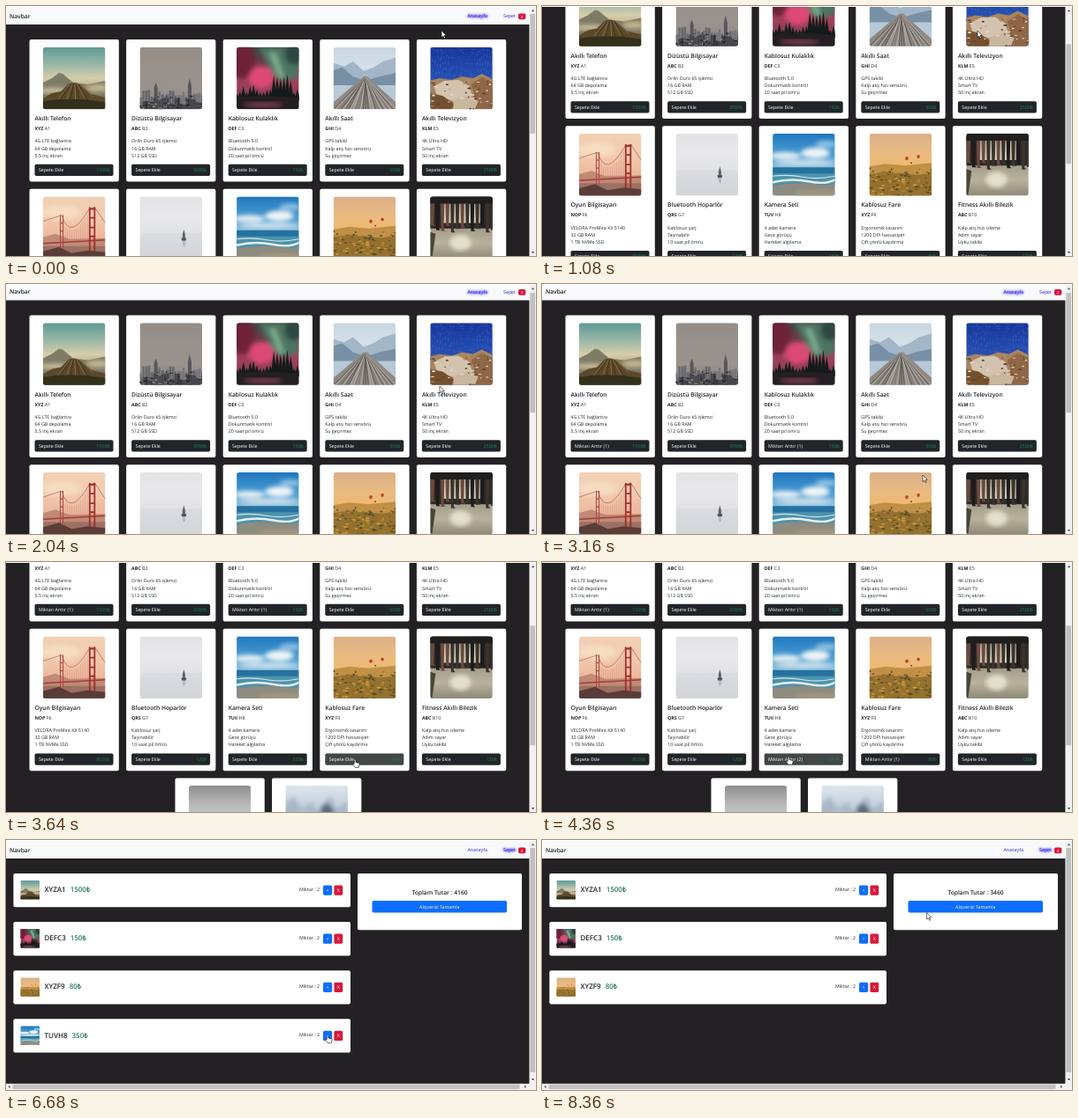
Recreate the animation shown at these times as an HTML page. Size 600 by 284 pixels, loop 8400 ms.

```html
<!DOCTYPE html>
<html lang="tr">
<head>
<meta charset="utf-8">
<title>Navbar</title>
<style>
html, body { margin: 0; width: 100%; height: 100%; overflow: hidden; background: #232123; }
svg { display: block; width: 100vw; height: 100vh; }
text { font: 5.3px "Open Sans", "Noto Sans", sans-serif; fill: #212529; text-rendering: geometricPrecision; white-space: pre; }
.title { font-size: 6.7px; font-weight: 600; }
.bold { font-weight: 700; }
.big { font-size: 8px; font-weight: 600; }
.white { fill: #fff; font-weight: 500; }
.green { fill: #198754; }
.big .green { fill: #2f7d62; }
.link { fill: #2a22e0; }
.active { filter: drop-shadow(0 0 1px #4a40ff) drop-shadow(0 0 1.5px #6a60ff); }
.mid { text-anchor: middle; }
.end { text-anchor: end; }
</style>
</head>
<body>
<svg id="stage" viewBox="0 0 600 284" xmlns="http://www.w3.org/2000/svg"></svg>
<script>
const LOOP = 8400, STEP = 40;
const CARD_Y = 38, ROW = 169.7, COL = 109.6;

// name, code, model, three features, price
const products = [
  ["Akıllı Telefon", "XYZ", "A1", "4G LTE bağlantısı", "64 GB depolama", "5.5 inç ekran", 1500],
  ["Dizüstü Bilgisayar", "ABC", "B2", "Orlin Duro k5 işlemci", "16 GB RAM", "512 GB SSD", 3000],
  ["Kablosuz Kulaklık", "DEF", "C3", "Bluetooth 5.0", "Dokunmatik kontrol", "20 saat pil ömrü", 150],
  ["Akıllı Saat", "GHI", "D4", "GPS takibi", "Kalp atış hızı sensörü", "Su geçirmez", 500],
  ["Akıllı Televizyon", "KLM", "E5", "4K Ultra HD", "Smart TV", "50 inç ekran", 2500],
  ["Oyun Bilgisayarı", "NOP", "F6", "VELDRA ProMira KX 5140", "32 GB RAM", "1 TB NVMe SSD", 8000],
  ["Bluetooth Hoparlör", "QRS", "G7", "Kablosuz şarj", "Taşınabilir", "10 saat pil ömrü", 120],
  ["Kamera Seti", "TUV", "H8", "4 adet kamera", "Gece görüşü", "Hareket algılama", 350],
  ["Kablosuz Fare", "XYZ", "F9", "Ergonomik tasarım", "1200 DPI hassasiyet", "Çift yönlü kaydırma", 80],
  ["Fitness Akıllı Bilezik", "ABC", "B10", "Kalp atış hızı izleme", "Adım sayar", "Uyku takibi", 120],
  ["Akıllı Lamba", "DEF", "C11", "LED aydınlatma", "Uzaktan kontrol", "Ayarlanabilir renk", 200],
  ["Tablet Standı", "GHI", "D12", "Alüminyum gövde", "Katlanabilir", "Kaymaz taban", 90]
];
const cartOrder = [0, 2, 8, 7];
// time, product, change of amount
const clicks = [
  [2440, 0, 1], [2880, 2, 1], [3680, 8, 1], [4040, 7, 1], [4280, 7, 1],
  [5800, 0, 1], [6040, 2, 1], [6360, 8, 1], [7280, 7, 1], [8000, 7, -3]
];
const CART_AT = 5280;
const scrollKeys = [[900, 0], [1080, 71.5], [1440, 276], [1580, 276], [1940, 2.5],
  [3240, 2.5], [3500, 132], [4780, 132], [5080, 0]];
const cursorKeys = [[1700, 493, 28], [2040, 491, 116], [2360, 75, 185], [2480, 75, 185],
  [2800, 290, 185], [2960, 290, 185], [3160, 431, 217], [3240, 431, 217], [3540, 395, 224],
  [3720, 395, 224], [3960, 279, 221], [4440, 279, 221], [4760, 596, 110], [5080, 596, 35],
  [5200, 590, 11], [5300, 588, 11], [5680, 364, 57], [5840, 364, 57], [5960, 364, 112],
  [6080, 364, 112], [6280, 364, 167], [6400, 364, 167], [6700, 364, 222], [7400, 364, 222],
  [7800, 376, 222], [8040, 376, 222], [8360, 435.5, 82.5]];

const svg = document.getElementById("stage");

function el(tag, attrs, parent, text) {
  const node = document.createElementNS(svg.namespaceURI, tag);
  for (const k in attrs) node.setAttribute(k, attrs[k]);
  if (text !== undefined) node.textContent = text;
  parent.append(node);
  return node;
}
const group = parent => el("g", {}, parent);
const box = (parent, x, y, width, height, fill, rx = 0) =>
  el("rect", { x, y, width, height, fill, rx }, parent);
const label = (parent, x, y, text, cls = "") => el("text", { x, y, class: cls }, parent, text);
const lira = n => n + "₺";
const show = (node, on) => node.setAttribute("display", on ? "inline" : "none");

// Pictures, each in a 70 x 70 square
const area = (d, fill, more = "") => `<path d="${d}" fill="${fill}" ${more}/>`;
const line = (d, stroke, w = 1) => `<path d="${d}" fill="none" stroke="${stroke}" stroke-width="${w}"/>`;
const spot = (x, y, r, fill, ry = r) => `<ellipse cx="${x}" cy="${y}" rx="${r}" ry="${ry}" fill="${fill}"/>`;
const soft = (...shapes) => `<g filter="url(#soft)">${shapes.join("")}</g>`;
function sky(id, ...stops) {
  const list = stops.map((c, i) => `<stop offset="${i / (stops.length - 1)}" stop-color="${c}"/>`).join("");
  return `<linearGradient id="${id}" x2="0" y2="1">${list}</linearGradient>` + area("M0 0H70V70H0Z", `url(#${id})`);
}
function random(seed) {
  return () => (seed = (seed * 16807) % 2147483647) / 2147483647;
}
function many(n, seed, draw) {
  const r = random(seed);
  return Array.from({ length: n }, (_, i) => draw(r, i)).join("");
}
// Specks scattered below a given height
const specks = (n, seed, top, ...colors) => many(n, seed, r =>
  spot(r() * 70, top + r() * (70 - top), .6 + r() * 2, colors[Math.floor(r() * colors.length)], .5 + r() * .6));

const pictures = [
  sky("s0", "#5f9a95", "#93b3a6", "#d5cdaa", "#b9a277", "#6a5a35") +
    area("M0 40L10 35L18 29L22 30L34 40L50 42L70 38V60H0Z", "#7d7a66") +
    soft(spot(12, 49, 20, "#cfc39f", 3), spot(62, 46, 14, "#c4b78f", 4)) +
    area("M0 58L10 52L20 50L29 41L36 40L43 43L54 53L70 57V70H0Z", "#5b482b") +
    many(9, 7, (r, i) => line(`M${30 + i * 1.4} 42L${15 + i * 5 + r() * 2} ${56 + r() * 6}`, i % 2 ? "#3d311c" : "#8a7043", .9)) +
    area("M0 61Q34 56 70 62V70H0Z", "#33301b"),
  sky("s1", "#948c85", "#99918b", "#9a928c", "#8b8583") +
    many(24, 17, (r, i) => area(`M${i * 3} 70v${-13 - r() * 10}h${2 + r()}V70Z`, r() > .5 ? "#66666c" : "#77757a")) +
    area("M16 70V46L18 40L20 46V70ZM54 70V44L56 35L58 44V70Z", "#56565d") +
    many(24, 31, (r, i) => area(`M${i * 3} 70v${-4 - r() * 10}h3V70Z`, r() > .5 ? "#36363c" : "#46464d")) +
    specks(40, 6, 55, "#8b8787", "#29292f"),
  sky("s2", "#3a4340", "#6f3a4c", "#a5405b", "#8d3f56", "#33292f") +
    soft(spot(6, 14, 14, "#6e2138", 22), spot(28, 34, 14, "#dd4a76", 12),
      area("M24 0H70V34L48 40L38 26Z", "#4c7562"), area("M36 6L44 6L54 34L48 36Z", "#7ba98a"), spot(64, 8, 10, "#2f4742", 12)) +
    many(20, 9, (r, i) => {
      const x = i * 3.8, h = 4 + r() * 10 + (x > 38 && x < 62 ? 14 : 0);
      return area(`M${x - 3.5} 60L${x} ${56 - h}L${x + 3.5} 60Z`, "#141b1a");
    }) + area("M0 56Q36 54 70 57V70H0Z", "#241f22") + soft(spot(30, 65, 22, "#7c3c50", 3)),
  sky("s3", "#c6d6e2", "#d5e0e8", "#c3d2de", "#b3c5d3") +
    area("M0 18L12 22L22 16L34 27L45 23L56 16L70 12V44H0Z", "#a3b6c7") +
    area("M0 26L10 23L22 33L36 38L52 33L70 29V45H0Z", "#7890a5") +
    area("M0 43H70V70H0Z", "#b7c9d7") +
    area("M34 33L38 33L70 62V70H0V62Z", "#8f8983") +
    many(26, 5, (r, i) => line(`M36 34L${i * 2.8} 70`, ["#55504d", "#b9b3ab", "#7a746f"][Math.floor(r() * 3)], .9)),
  sky("s4", "#17369a", "#2148ae", "#2c55b0", "#42609a") +
    many(14, 4, (r, i) => `<circle cx="38" cy="18" r="${3 + i * 3}" fill="none" stroke="#7f9cdc" stroke-width=".3" stroke-dasharray="${1 + r() * 4} ${4 + r() * 7}"/>`) +
    area("M0 38L10 35L24 37L36 33L48 35L58 30L70 36V70H0Z", "#a8845f") +
    area("M4 44L16 38L32 37L44 44L47 55L30 62L8 56Z", "#d3c3ae") +
    area("M46 42L58 34L70 40V70H42L50 54Z", "#8f6646") +
    area("M0 52L14 55L27 64L24 70H0Z", "#75502f") + area("M26 60L44 54L54 61L50 70H26Z", "#c9b69e") +
    specks(60, 8, 38, "#5c4330", "#e0d3c0", "#b18a60"),
  sky("s5", "#f0d0b4", "#f2cbb0", "#edb79c", "#d39179") +
    soft(spot(20, 18, 22, "#f6dcc0", 8)) +
    area("M0 46L14 42L30 48L70 47V70H0Z", "#c08a77") +
    area("M0 56H70V70H0Z", "#9c7063") +
    line("M0 28L21 21Q30 52 52 14L58 12L70 30", "#b8574b", .7) +
    line("M0 53L70 49", "#a03a34", 1.5) +
    line("M19.5 58V21M22.5 58V21M20 30H22M20 39H22", "#b04a40", 1.1) +
    line("M52.5 64V12M58 64V12M53 14H58M53 24H58M53 35H58M53 45H58", "#a23029", 1.8) +
    many(11, 3, (r, i) => line(`M${25 + i * 2.5} 51V${38 - Math.pow((i - 3) / 2, 2) * 1.5}`, "#c27768", .3)) +
    area("M0 62L18 57L32 64L50 61L70 63V70H0Z", "#5a3d38"),
  sky("s6", "#e3e3e5", "#e8e8ea", "#e0e1e4", "#cfd2d6") +
    area("M0 41H70V70H0Z", "#d5d7db", 'opacity=".6"') +
    area("M49.5 37L51 43V48H48V43Z", "#5e6269") + area("M46.5 47H52.5L51.5 50H47.5Z", "#4b4f56") +
    area("M48 50H51V56H48.5Z", "#b4b7bc"),
  sky("s7", "#1f78bd", "#4a9bd2", "#a9cfe2", "#6ba3c0") +
    soft(spot(14, 25, 18, "#e6eff3", 4), spot(48, 22, 16, "#eef4f6", 6), spot(60, 12, 12, "#8dbfe0", 4), spot(36, 33, 34, "#d3e4ec", 3)) +
    area("M0 38H70V56H0Z", "#24729f") + area("M0 45H70V60H0Z", "#4b93ad") +
    line("M0 48Q18 46 34 49T70 48", "#d4e4e6", 1.2) + line("M0 55Q20 50 40 54T70 52", "#e9efec", 2.4) +
    area("M0 59Q26 54 48 57T70 55V70H0Z", "#8e8b7f") + soft(spot(50, 68, 26, "#a3967f", 4)),
  sky("s8", "#dcb088", "#eabb80", "#f0b862", "#a97f38") +
    area("M0 37L18 34L39 36L70 33V70H0Z", "#c08f48") +
    area("M0 46Q20 41 40 45T70 42V70H0Z", "#94712f") +
    specks(130, 12, 39, "#5f5424", "#d09a3c", "#7a5c28", "#494a27", "#b8862f") +
    spot(42, 28, 1.8, "#c0452f", 2.2) + spot(55, 26, 1.7, "#b8432f", 2) + spot(47, 33, 1, "#7e4935"),
  sky("s9", "#2a2825", "#5d564b", "#a39c88", "#b7b19d", "#8f8977") +
    area("M0 0H70V36H0Z", "#2a2826") + area("M14 8H56V30H14Z", "#cfcab8") +
    many(13, 22, (r, i) => {
      const x = i * 5.6, y = 33 + r() * 8;
      return area(`M${x} 0h5l-1 ${y - 2}l2 2h-5Z`, ["#1d1c1b", "#3a332c", "#6b4a3c"][Math.floor(r() * 3)]);
    }) + area("M0 0H70V8H0Z", "#211f1e") +
    soft(spot(34, 52, 12, "#e3dfcd", 9)) + area("M0 40L6 42L2 70H0Z", "#4b4436"),
  sky("s10", "#8f8f8f", "#bdbdbc", "#c9c9c8", "#777776") +
    area("M0 45Q35 32 70 46V70H0Z", "#858585"),
  sky("s11", "#dce5ec", "#c4d0dd", "#8093a7", "#536578") +
    soft(area("M0 20L9 12L18 28L30 18L36 34L50 11L58 27L70 16V70H0Z", "#a8b8c9"),
      area("M40 70V24L47 19L54 27V70Z", "#596b80"), spot(20, 39, 13, "#e3eaf0", 8))
];
svg.innerHTML = `<defs><clipPath id="round"><rect width="70" height="70" rx="3"/></clipPath>
  <filter id="soft"><feGaussianBlur stdDeviation="2.5"/></filter>${
  pictures.map((p, i) => `<g id="pic${i}" clip-path="url(#round)">${p}</g>`).join("")}</defs>`;
const picture = (parent, i, x, y, size) =>
  el("use", { href: "#pic" + i, transform: `translate(${x} ${y}) scale(${size / 70})` }, parent);

// Shared page and navigation bar
box(svg, 0, 0, 600, 284, "#232123");
const page = group(svg);
const nav = group(page);
box(nav, 0, 0, 593, 21, "#f8f9fa");
label(nav, 4, 13.6, "Navbar", "title");
const home = label(nav, 522.5, 13.3, "Anasayfa", "link");
const basket = label(nav, 563, 13.3, "Sepet", "link");
box(nav, 580, 8.5, 8.3, 6.8, "#d9173c", 1.7);
const badge = label(nav, 584.1, 13.5, "0", "white bold mid");
badge.style.fontSize = "4px";

// Product list
const shop = group(page);
const cards = products.map(([name, code, model, a, b, c, price], i) => {
  const row = Math.floor(i / 5);
  const x = 26.5 + (i % 5) * COL + (row === 2 ? COL * 1.505 : 0);
  const y = CARD_Y + row * ROW;
  const g = el("g", { transform: `translate(${x} ${y})` }, shop);
  box(g, 0, 0, 101.3, 161.5, "#fff", 2);
  picture(g, i, 15.4, 8.7, 70.5);
  label(g, 6, 92, name, "title");
  const sub = label(g, 6, 103.2, "");
  el("tspan", { class: "bold" }, sub, code);
  el("tspan", {}, sub, " " + model);
  [a, b, c].forEach((s, k) => label(g, 6, 117.4 + k * 8.2, s));
  const face = box(g, 6, 141.7, 89, 13.4, "#212529", 1.8);
  const text = label(g, 10.4, 150.3, "Sepete Ekle", "white");
  label(g, 91, 150.3, lira(price), "green end");
  return { x: x + 6, y: y + 141.7, face, text };
});

// Cart
const cart = group(page);
const lines = cartOrder.map(i => {
  const [, code, model, , , , price] = products[i];
  const g = group(cart);
  box(g, 8.4, 0, 381.6, 38.3, "#fff", 2);
  picture(g, i, 16.4, 8, 21.6);
  const t = label(g, 43.5, 21.3, code + model, "big");
  el("tspan", { dx: 5, class: "green" }, t, lira(price));
  const amount = label(g, 332, 19.8, "");
  amount.style.fontWeight = 500;
  box(g, 359, 13.5, 10.2, 11.2, "#0d6efd", 1.6);
  label(g, 364.1, 20.8, "+", "white mid");
  box(g, 371.4, 13.5, 9.8, 11.2, "#d9173c", 1.6);
  label(g, 376.3, 20.8, "X", "white mid");
  return { g, amount };
});
box(cart, 398, 38, 186, 64.3, "#fff", 2);
const total = label(cart, 491, 62.2, "", "title mid");
box(cart, 414.5, 69, 152.5, 13.6, "#0d6efd", 1.8);
label(cart, 490.8, 77.7, "Alışverişi Tamamla", "white mid");

// Scroll bars and window edge
const TRACK = "#f1f1f1", THUMB = "#c1c1c1", ARROW = "#505050";
box(svg, 592.4, 0, 7.6, 284, TRACK);
const thumb = box(svg, 593.4, 9, 5.6, 136, THUMB);
el("path", { d: "M594.8 6.2L596.5 4L598.2 6.2Z", fill: ARROW }, svg);
const down = el("path", { d: "M594.8 279L596.5 281.2L598.2 279Z", fill: ARROW }, svg);
const lower = group(svg);
box(lower, 0, 276.8, 600, 7.2, TRACK);
box(lower, 7.5, 277.6, 574, 5.4, THUMB);
el("path", { d: "M4.6 278.6L2.6 280.3L4.6 282ZM587 278.6L589 280.3L587 282Z", fill: ARROW }, lower);
box(svg, 0, 0, 600, 1, "#fff");

// Pointer
const pointer = group(svg);
const arrow = el("path", { d: "M0 0V7.6L1.8 6L3.1 8.8L4.3 8.2L3 5.5H5.3Z", fill: "#fff", stroke: "#111", "stroke-width": .6 }, pointer);
const hand = el("path", { d: "M-.8 .6Q0 -.6 .9 .6V3.6L4.6 4.4Q5.3 4.8 5.1 6L4.3 9.4H.2L-2.6 5.8Q-2.4 4.6 -.8 5.6Z", fill: "#fff", stroke: "#111", "stroke-width": .6 }, pointer);

function at(keys, t, ease = u => u) {
  if (t <= keys[0][0]) return keys[0].slice(1);
  for (let i = 1; i < keys.length; i++) {
    const a = keys[i - 1], b = keys[i];
    if (t <= b[0]) {
      const u = ease((t - a[0]) / (b[0] - a[0]));
      return a.slice(1).map((v, k) => v + (b[k + 1] - v) * u);
    }
  }
  return keys[keys.length - 1].slice(1);
}
const smooth = u => u * u * (3 - 2 * u);
const inside = (x, y, left, top, w, h) => x >= left && x <= left + w && y >= top && y <= top + h;

function draw(t) {
  const inCart = t >= CART_AT;
  const [scroll] = at(scrollKeys, t);
  const [x, y] = at(cursorKeys, t, smooth);
  const amounts = products.map(() => 0);
  for (const [time, i, change] of clicks) if (t >= time) amounts[i] += change;

  page.setAttribute("transform", `translate(0 ${-scroll})`);
  show(shop, !inCart);
  show(cart, inCart);
  show(lower, inCart);
  home.setAttribute("class", inCart ? "link" : "link active");
  basket.setAttribute("class", inCart ? "link active" : "link");
  badge.textContent = amounts.reduce((sum, n) => sum + n, 0);

  let pressable = inside(x, y + scroll, 560, 6, 31, 11);
  if (inCart) {
    let slot = 0, sum = 0;
    lines.forEach(({ g, amount }, k) => {
      const n = amounts[cartOrder[k]];
      show(g, n > 0);
      if (!n) return;
      const top = CARD_Y + slot++ * 55.1;
      g.setAttribute("transform", `translate(0 ${top})`);
      amount.textContent = "Miktar : " + n;
      sum += n * products[cartOrder[k]][6];
      pressable ||= inside(x, y, 359, top + 13.5, 22, 11.2);
    });
    total.textContent = "Toplam Tutar : " + sum;
  } else {
    cards.forEach((card, i) => {
      const hover = inside(x, y + scroll, card.x, card.y, 89, 13.4);
      card.face.setAttribute("fill", hover ? "#424649" : "#212529");
      card.text.textContent = amounts[i] ? `Miktarı Arttır (${amounts[i]})` : "Sepete Ekle";
      pressable ||= hover;
    });
  }
  thumb.setAttribute("y", 9 + scroll * .48);
  thumb.setAttribute("height", inCart ? 255 : 136);
  down.setAttribute("transform", `translate(0 ${inCart ? -8 : 0})`);
  pointer.setAttribute("transform", `translate(${x} ${y})`);
  show(arrow, !pressable);
  show(hand, pressable);
}

const start = performance.now();
function tick() {
  const t = (performance.now() - start) % LOOP;
  draw(Math.floor(t / STEP) * STEP);
  requestAnimationFrame(tick);
}
tick();
</script>
</body>
</html>
```
